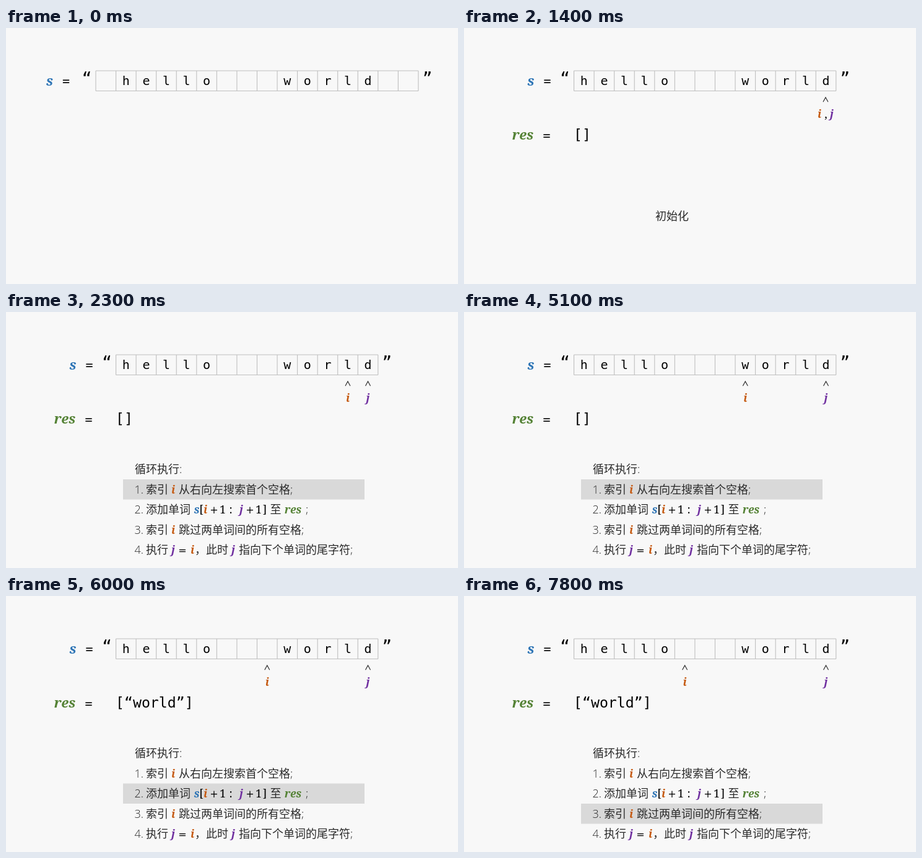
Animation of 730x413 px, one loop 8000 ms. Source, as an HTML page:

```html
<!DOCTYPE html>
<html lang="zh-CN">
<meta charset="utf-8">
<title>Reverse words</title>
<style>
  html, body { margin: 0; width: 100%; height: 100%; overflow: hidden; background: #f8f8f8; }
  svg { display: block; width: 730px; height: 413px; }
  .cn { font: 300 18px "Open Sans", "Noto Sans CJK SC", "Noto Sans CJK", sans-serif; fill: #2a2a2a; }
  .mono { font: 20px "DejaVu Sans Mono", monospace; }
  .big { font-size: 23.2px; }
  .quote { font-size: 26px; }
  .math { font: 18px "Noto Serif", serif; }
  .op { font: 16px "DejaVu Serif", serif; }
  .var { font: italic bold 17.5px "Noto Serif", serif; }
  .large { font-size: 22px; }
  .mid { text-anchor: middle; }
  .s { fill: #2e75b6; } .res { fill: #548235; } .i { fill: #c55a11; } .j { fill: #7030a0; }
  path { fill: none; stroke: #bfbfbf; stroke-width: 1.1; }
  .caret { stroke: #222; }
</style>
<svg id="stage" viewBox="0 0 730 413"></svg>
<script>
const stage = document.getElementById('stage');
const CELL = 32.56, LEFT = 145, ROW = 32.5;
const chars = ' hello   world  ';

const text = (x, y, str, cls) => `<text x="${x}" y="${y}" class="${cls}">${str}</text>`;
const mid = (x, y, str, cls) => text(x, y, str, cls + ' mid');
const variable = (x, y, name, size = '') => mid(x, y, name, `var ${name} ${size}`);
const center = k => LEFT + (k + 0.5) * CELL;
const caret = x => `<path class="caret" d="M${x - 4} 119.2L${x} 112L${x + 4} 119.2"/>`;
const pointer = (k, name) => caret(center(k)) + variable(center(k), 145.3, name);

function stringRow(from, to, sX, eqX) {
  const x0 = LEFT + from * CELL, x1 = LEFT + to * CELL;
  let lines = `M${x0} 69H${x1}M${x0} 101.5H${x1}`, out = '';
  for (let k = from; k <= to; k++) {
    lines += `M${LEFT + k * CELL} 69V101.5`;
    if (k < to) out += mid(center(k), 92, chars[k], 'mono');
  }
  return `<path d="${lines}"/>` + out + variable(sX, 92.5, 's', 'large') +
    mid(eqX, 92, '=', 'mono') + mid(x0 - 14.5, 90, '“', 'mono quote') +
    mid(x1 + 14.5, 90, '”', 'mono quote');
}

const resultRow = value => variable(95, 180, 'res', 'large') +
  mid(133.5, 180, '=', 'mono') + text(177, 180, value, 'mono big');

function steps(active) {
  const y = k => 260.3 + k * ROW;
  const cn = (x, k, str) => text(x, y(k), str, 'cn');
  const v = (x, k, name) => variable(x, y(k), name);
  const m = (x, k, str) => mid(x, y(k), str, 'math');
  const op = (x, k, str) => mid(x, y(k), str, 'op');
  return `<rect x="189" y="${270 + (active - 1) * ROW}" width="390" height="${ROW}" fill="#d9d9d9"/>` +
    [1, 2, 3, 4].map(k => cn(207.5, k, k + '.')).join('') +
    cn(208, 0, '循环执行:') +
    cn(226, 1, '索引') + v(270, 1, 'i') + cn(279, 1, '从右向左搜索首个空格;') +
    cn(226, 2, '添加单词') + v(308, 2, 's') + m(315.5, 2, '[') + v(322, 2, 'i') +
    op(336, 2, '+') + m(350, 2, '1') + m(363, 2, ':') + v(380, 2, 'j') + op(394, 2, '+') +
    m(408, 2, '1') + m(418, 2, ']') + cn(426.5, 2, '至') + v(463.5, 2, 'res') + cn(484, 2, ';') +
    cn(226, 3, '索引') + v(270, 3, 'i') + cn(279, 3, '跳过两单词间的所有空格;') +
    cn(226, 4, '执行') + v(270, 4, 'j') + op(285, 4, '=') + v(301, 4, 'i') + cn(305, 4, '，') +
    cn(323, 4, '此时') + v(367, 4, 'j') + cn(376, 4, '指向下个单词的尾字符;');
}

const trimmed = stringRow(1, 14, 108, 134.5);
const caption = str => mid(336, 309.5, str, 'cn');
const loop = (i, active, value) =>
  trimmed + pointer(i, 'i') + pointer(13, 'j') + resultRow(value) + steps(active);

const scenes = [
  [0, stringRow(0, 16, 70.5, 97)],
  [500, trimmed + caption('删除首尾空格')],
  [1400, trimmed + caret(584) + variable(574, 145.3, 'i') + mid(584.5, 145, ',', 'math') +
    variable(594, 145.3, 'j') + resultRow('[]') + caption('初始化')],
  [2300, loop(12, 1, '[]')],
  [3200, loop(11, 1, '[]')],
  [4200, loop(10, 1, '[]')],
  [5100, loop(9, 1, '[]')],
  [6000, loop(8, 2, '[“world”]')],
  [6900, loop(7, 3, '[“world”]')],
  [7800, loop(6, 3, '[“world”]')],
];

let shown;
function draw(now) {
  const t = now % 8000;
  const scene = scenes.findLast(([start]) => start <= t);
  if (scene !== shown) stage.innerHTML = (shown = scene)[1];
  requestAnimationFrame(draw);
}
draw(performance.now());
</script>
</html>
```
